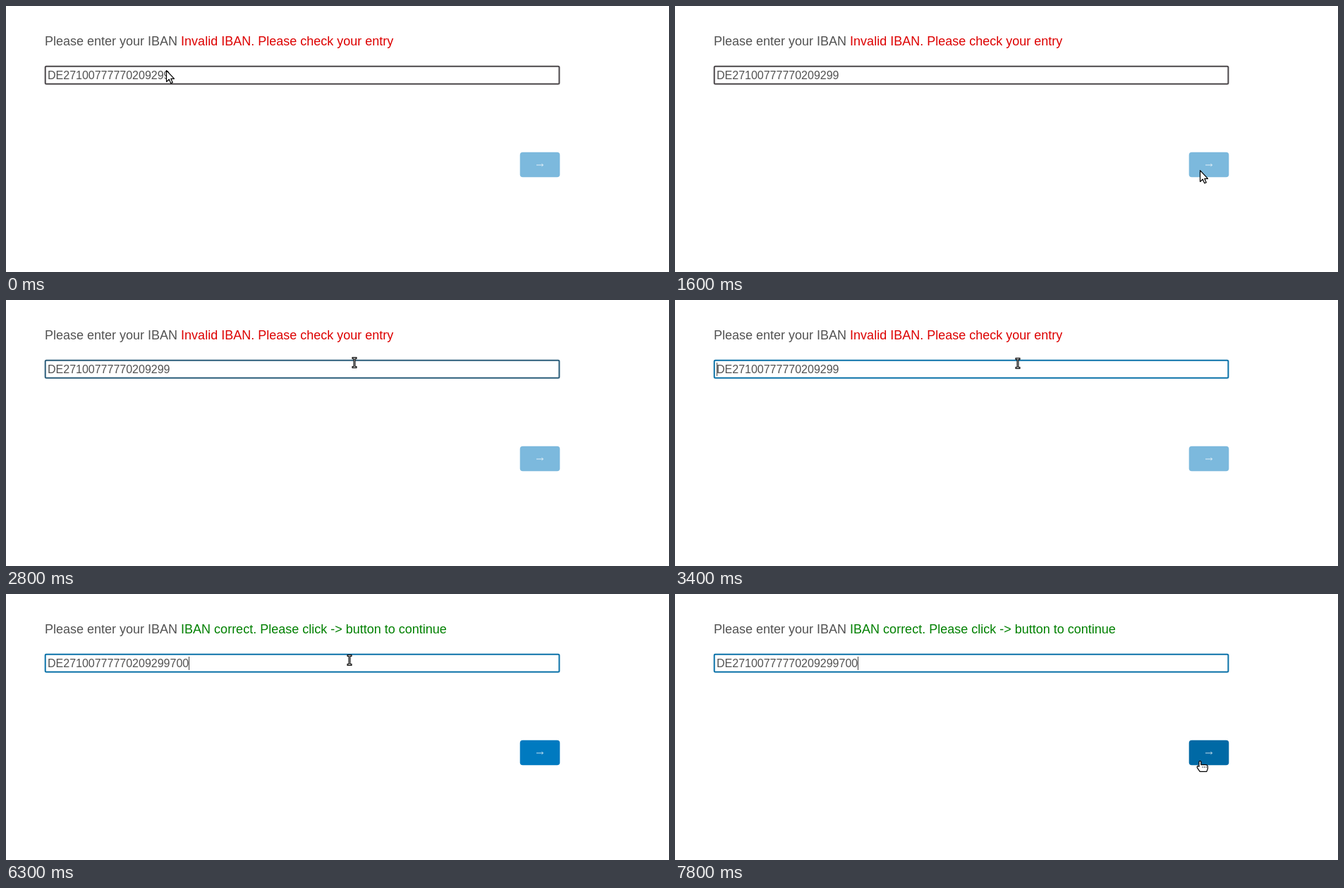
Recreate the animation shown at these times as an HTML page. Size 940x378 px, loop 8 s.

```html
<!DOCTYPE html>
<html lang="en">
<head>
<meta charset="utf-8">
<title>IBAN check</title>
<style>
  html, body { margin: 0; width: 100%; height: 100%; overflow: hidden; background: #fff; }
  body { position: relative; font-family: "Liberation Sans", Arial, sans-serif; color: #525252; }
  body > * { position: absolute; white-space: pre; }
  #label { left: 55px; top: 40px; font-size: 18px; line-height: 20px; }
  #value { left: 59px; top: 90px; font-size: 16px; line-height: 17px; }
  #caret { top: 89px; width: 1px; height: 19px; background: #444; }
  svg { left: 0; top: 0; width: 940px; height: 378px; }
</style>
</head>
<body>
<svg viewBox="0 0 940 378">
  <rect id="field" x="55.7" y="85.7" width="728.7" height="25.1" rx="1.5" fill="none" stroke-width="2"/>
  <rect id="next" x="728.7" y="207.7" width="56.6" height="35.6" rx="4"/>
  <path d="M752 226H761M759.5 224.3L761.7 226L759.5 227.7" fill="none" stroke="#fff" stroke-width=".9" opacity=".85"/>
</svg>
<div id="label">Please enter your IBAN <span id="message"></span></div>
<div id="value"></div>
<div id="caret"></div>
<svg viewBox="0 0 940 378">
  <g id="pointer" fill="#fff" stroke="#000" stroke-width="1.2" stroke-linejoin="round">
    <g id="arrow">
      <path d="M1 1.5V17.5L4.7 14.1L7.2 19.7L9.8 18.6L7.3 13.2H12Z" fill="#000" stroke="none" opacity=".25"/>
      <path d="M.5 .7V16.6L4.2 13.2L6.7 18.8L9.2 17.7L6.8 12.3H11.5Z"/>
    </g>
    <g id="beam" fill="none" stroke-linecap="square">
      <path d="M-2 -6.5H2M0 -6.5V6.5M-2 6.5H2" stroke-width="3"/>
      <path d="M-2 -6.5H2M0 -6.5V6.5M-2 6.5H2" stroke="#fff" stroke-width=".9" opacity=".8"/>
    </g>
    <g id="hand">
      <path d="M-1 8.2V1.6Q-.9 .4 .4 .4Q1.7 .4 1.8 1.6V5.6H8.6Q11 5.8 11.3 7.8V11.2L9.8 15.4H.2L-3.6 9.8Q-4.2 7.8 -2.6 7.4Z"/>
      <path d="M4 8V10M6.5 8V10M9 8V10" stroke-width=".7"/>
    </g>
  </g>
</svg>
<script>
const LOOP = 8000, STEP = 100;
const IBAN = "DE27100777770209299700";
const FOCUS = 2800, TO_END = 3500, VALID = 5900, BLINK = 600;
const keys = [5400, 5700, VALID];
const wakes = [FOCUS + STEP, TO_END, 5300, ...keys, 7400];

// Pointer moves: start, end, x, y
const home = [227, 91];
const moves = [
  [0, 100, 226, 87], [200, 500, 531, 214], [600, 1000, 698, 242],
  [1000, 1200, 724, 235], [1300, 1700, 748, 233], [1800, 2100, 675, 205],
  [2200, 2600, 494, 89], [2700, 3400, 486, 90], [3400, 3800, 484, 92],
  [6200, 7700, 744, 237]
];

const $ = id => document.getElementById(id);
const clamp = k => Math.min(1, Math.max(0, k));
const smooth = k => k * k * (3 - 2 * k);
const inside = (x, y, l, t, r, b) => x >= l && x < r && y >= t && y < b;

function position(t) {
  let [x, y] = home;
  for (const [from, to, endX, endY] of moves) {
    const k = smooth(clamp((t - from) / (to - from)));
    x += (endX - x) * k;
    y += (endY - y) * k;
  }
  return [Math.round(x), Math.round(y)];
}

const pen = document.createElement("canvas").getContext("2d");
pen.font = '16px "Liberation Sans", Arial, sans-serif';

function draw(t) {
  const valid = t >= VALID;
  const [x, y] = position(t);
  const hover = valid && inside(x, y, 729, 208, 785, 243);
  const kind = hover ? "hand"
    : t > 2200 && inside(x, y, 55, 85, 785, 112) ? "beam" : "arrow";

  $("message").textContent = valid
    ? "IBAN correct. Please click -> button to continue"
    : "Invalid IBAN. Please check your entry";
  $("message").style.color = valid ? "#008000" : "#dd0000";

  const focus = clamp((t - FOCUS + STEP) / (2 * STEP)) * 100;
  $("field").style.stroke = `color-mix(in srgb, #0b72a9 ${focus}%, #4b474a)`;
  $("next").style.fill = hover ? "#0069a5" : valid ? "#007ac0" : "#7cb9dd";

  const text = IBAN.slice(0, IBAN.length - keys.filter(k => k > t).length);
  $("value").textContent = text;
  const before = t < TO_END ? "" : text;
  $("caret").style.left = Math.round(59 + pen.measureText(before).width) + "px";
  $("caret").hidden = !wakes.some(w => t >= w && t < w + BLINK)
    || (t < TO_END && t <= FOCUS);

  $("pointer").setAttribute("transform", `translate(${x} ${y})`);
  for (const id of ["arrow", "beam", "hand"])
    $(id).style.display = id === kind ? "" : "none";
}

const start = performance.now();
function tick() {
  const t = (performance.now() - start) % LOOP;
  draw(Math.floor(t / STEP) * STEP);
  requestAnimationFrame(tick);
}
tick();
</script>
</body>
</html>
```
